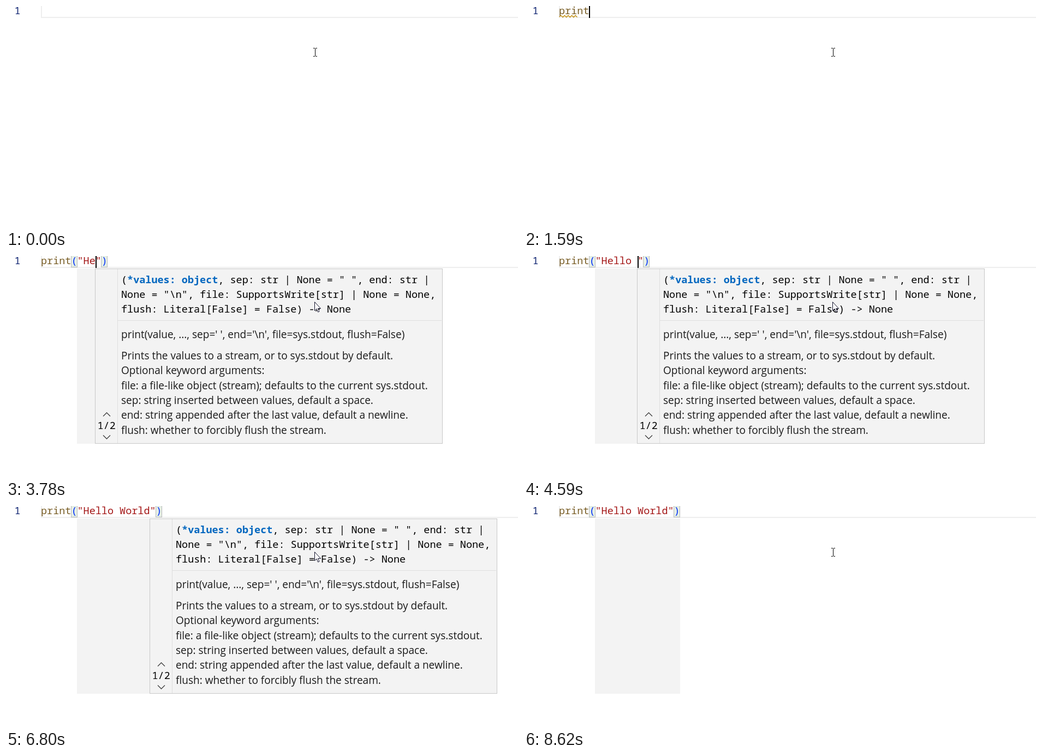
Write an HTML page that moves like this. It is 938x408 px and loops after 8820 ms.

```html
<!DOCTYPE html>
<html lang="en">
<head>
<meta charset="utf-8">
<title>Typing with signature help</title>
<style>
  html, body { margin: 0; width: 100%; height: 100%; overflow: hidden; background: #fff; }
  svg { display: block; width: 938px; height: 408px; }
  text { white-space: pre; }
  .mono { font-family: "Noto Sans Mono", "DejaVu Sans Mono", monospace; font-size: 18.48px; }
  .doc { font-family: "Open Sans", "Noto Sans", sans-serif; font-size: 19.05px; fill: #1a1a1a; }
  .match { fill: #e5efe5; stroke: #b9b9b9; }
  .bracket { fill: #0431fa; }
  .string { fill: #a31515; }
  .line { fill: none; stroke: #dedede; }
  .chevron { fill: none; stroke: #424242; stroke-width: 1.4; }
</style>
</head>
<body>
<svg viewBox="0 0 938 408">
  <path d="M65 0V21H938" fill="none" stroke="#eee" stroke-width="2"/>
  <text class="mono" x="15.5" y="15" fill="#0b216f">1</text>

  <g id="brackets">
    <rect class="match" x="119.5" y="-.5" width="11" height="21"/>
    <rect class="match" id="closeBox" y="-.5" width="11" height="21"/>
  </g>
  <text class="mono" x="64" y="15"><tspan id="name" fill="#795e26"></tspan><tspan id="open" class="bracket"></tspan><tspan id="string" class="string"></tspan><tspan id="close" class="bracket"></tspan></text>
  <path id="squiggle" fill="none" stroke="#bf8803" stroke-width="1.3"/>
  <rect id="caret" y="0" width="2" height="22"/>

  <rect id="suggestions" x="77.5" y="22.5" width="619" height="333" fill="#f3f3f3" stroke="#c8c8c8"/>
  <rect id="trail" x="130" y="23" height="322" fill="#f3f3f3"/>

  <g id="hint">
    <rect x="-.5" y="23.5" width="636" height="321" fill="#f3f3f3" stroke="#c8c8c8"/>
    <path class="line" d="M40.5 24V344M41 118.5H634"/>
    <path class="chevron" d="M14 294.5L20.5 288L27 294.5M14 329.5L20.5 336L27 329.5"/>
    <text class="mono" x="3.5" y="318">1/2</text>
    <g class="mono" id="signature">
      <text x="47" y="50">(<tspan fill="#0066bf" font-weight="700">*values: object</tspan>, sep: str | None = " ", end: str |</text>
      <text x="47" y="77">None = "\n", file: SupportsWrite[str] | None = None,</text>
      <text x="47" y="104">flush: Literal[False] = False) -&gt; None</text>
    </g>
    <g class="doc">
      <text x="47" y="151">print(value, ..., sep=' ', end='\n', file=sys.stdout, flush=False)</text>
      <text x="47" y="190">Prints the values to a stream, or to sys.stdout by default.</text>
      <text x="47" y="217">Optional keyword arguments:</text>
      <text x="47" y="244.5">file: a file-like object (stream); defaults to the current sys.stdout.</text>
      <text x="47" y="271.5">sep: string inserted between values, default a space.</text>
      <text x="47" y="299">end: string appended after the last value, default a newline.</text>
      <text x="47" y="326.5">flush: whether to forcibly flush the stream.</text>
    </g>
  </g>

  <path id="ibeam" d="M563 77.5H565.5L566.5 78.5L567.5 77.5H570M566.5 78V92M563 92.5H565.5L566.5 91.5L567.5 92.5H570" fill="none" stroke="#000"/>
  <path id="arrow" d="M565.5 84.5V100.5L569 97L571.5 103L574 102L571.5 96.5H576.5Z" fill="#fff" stroke="#10102a"/>
</svg>
<script>
const LOOP = 8820, LEFT = 64, ADVANCE = 11.09;
const CODE = 'print("Hello World")';
// One time per typed character of CODE.
const KEYS = [610, 810, 1000, 1200, 1400, 1790, 2800, 3390, 3780, 3980,
  4190, 4390, 4590, 4980, 5590, 5800, 6190, 6390, 7200, 7410];
const CARET_OFF = [[0, 200], [2390, 2800], [3190, 3390], [5390, 5590],
  [6800, 7200], [7610, 8220], [8620, LOOP]];
const HINT = [2000, 7610];

const el = id => document.getElementById(id);
const within = (t, [from, to]) => t >= from && t < to;
const show = (id, on) => { el(id).style.display = on ? '' : 'none'; };
const columnX = column => Math.round(LEFT + column * ADVANCE);

let wave = 'M64.5 20';
for (let i = 1; i <= 10; i++) wave += `L${64.5 + i * 3.3} ${i % 2 ? 17.5 : 20.5}`;
el('squiggle').setAttribute('d', wave);

function render(t) {
  const column = KEYS.filter(time => time <= t).length;
  const x = columnX(column);
  const called = column > 5;
  // The editor closes brackets and quotes by itself.
  const string = CODE.slice(6, Math.min(column, 18)) + (column > 6 ? '"' : '');

  el('name').textContent = CODE.slice(0, Math.min(column, 5));
  el('open').textContent = called ? '(' : '';
  el('string').textContent = string;
  el('close').textContent = called ? ')' : '';
  el('closeBox').setAttribute('x', columnX(6 + string.length) - 0.5);
  show('brackets', called);

  el('caret').setAttribute('x', x);
  show('caret', !CARET_OFF.some(span => within(t, span)));
  show('squiggle', within(t, [1200, 2190]));
  show('suggestions', within(t, [810, 1590]));

  const hinting = within(t, HINT);
  show('hint', hinting);
  show('arrow', hinting);
  show('ibeam', !hinting);
  el('hint').setAttribute('transform', `translate(${x})`);
  show('trail', t >= HINT[0]);
  el('trail').setAttribute('width', Math.max(0, x - 130));
}

const start = performance.now();
function tick() {
  render((performance.now() - start) % LOOP);
  requestAnimationFrame(tick);
}
tick();
</script>
</body>
</html>
```
